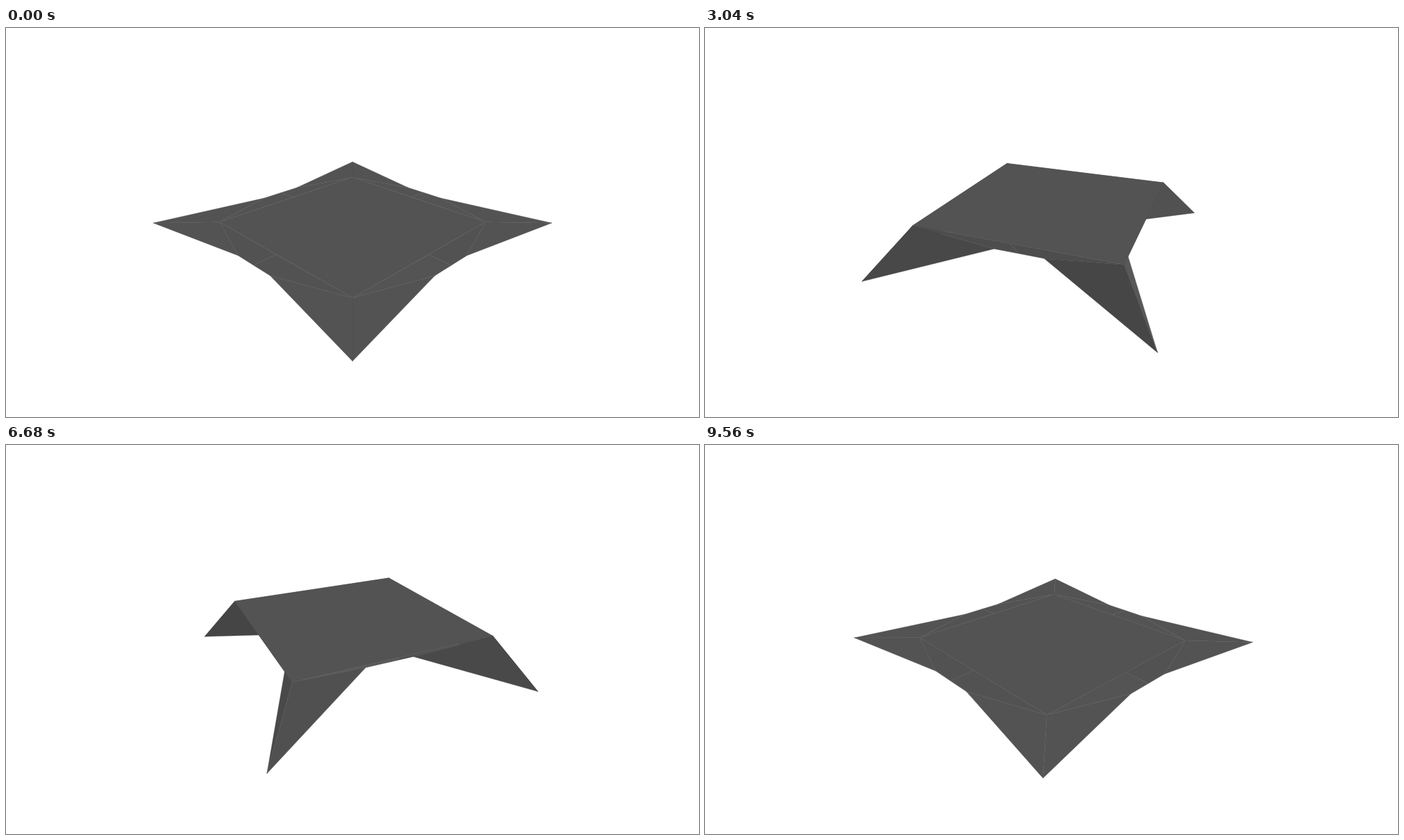
An HTML page with a canvas for the animation above (9.6 s loop, 998 px wide and 561 px high).

```html
<!DOCTYPE html>
<html>
<head>
<meta charset="utf-8">
<title>Folding table</title>
<style>
html, body { margin: 0; width: 100%; height: 100%; overflow: hidden; background: #fff; }
canvas { display: block; }
</style>
</head>
<body>
<canvas id="stage" width="998" height="561"></canvas>
<script>
const ctx = document.getElementById('stage').getContext('2d');
const LOOP = 9600, STEP = 40;
const DIST = 19.85, FOCAL = 671.6, SIN = 0.4252, COS = 0.905;
const CAM = [0, DIST * COS, DIST * SIN];

const sub = (a, b) => a.map((v, i) => v - b[i]);
const dot = (a, b) => a[0] * b[0] + a[1] * b[1] + a[2] * b[2];
const unit = v => { const l = Math.hypot(...v) || 1; return v.map(c => c / l); };
const cross = (a, b) => [
  a[1] * b[2] - a[2] * b[1],
  a[2] * b[0] - a[0] * b[2],
  a[0] * b[1] - a[1] * b[0]
];

// Side coordinates (outward, along, up) to the stage (right, near, up).
const turn = (p, a) => [
  p[0] * Math.sin(a) + p[1] * Math.cos(a),
  p[0] * Math.cos(a) - p[1] * Math.sin(a),
  p[2]
];

const depth = p => DIST - p[1] * COS - p[2] * SIN;

function project(p) {
  const k = FOCAL / depth(p);
  return [499 + p[0] * k, 280.5 + (p[1] * SIN - p[2] * COS) * k];
}

function shade(n, half) {
  let v = 80 + 8 * n[0] - 10 * n[1] + 3 * n[2] + 12 * Math.max(0, -n[2]);
  return v - half * 18 * Math.max(0, n[0]);
}

// Leg angle that keeps every panel rigid for a given rim angle.
function legAngle(rim) {
  const p = 3 - Math.cos(rim), q = Math.SQRT2 * Math.sin(rim);
  return Math.acos(Math.min(1, 2 / Math.hypot(p, q))) - Math.atan2(q, p);
}

function sidePanels(rim) {
  const leg = legAngle(rim);
  const out = 4 + 2 * Math.cos(leg), top = Math.SQRT2 * Math.sin(leg);
  const edge = 4 + Math.cos(rim), low = top - Math.sin(rim);
  const T = s => [4, 4 * s, top];
  const E = s => [edge, s, low];
  const C = s => [out, out * s, -top];
  const M = [4, 0, top], N = [edge, 0, low];
  return {
    corner: T(1),
    panels: [
      { pts: [T(1), E(1), C(1)], half: 0 },
      { pts: [T(-1), C(-1), E(-1)], half: 0 },
      { pts: [T(1), M, N, E(1)], half: 1 },
      { pts: [M, T(-1), E(-1), N], half: -1 }
    ]
  };
}

function fill(pts, tone) {
  const v = Math.round(tone);
  ctx.fillStyle = ctx.strokeStyle = `rgb(${v},${v},${v})`;
  ctx.lineWidth = 0.4;
  ctx.lineJoin = 'round';
  ctx.beginPath();
  pts.forEach(p => ctx.lineTo(...project(p)));
  ctx.closePath();
  ctx.fill();
  ctx.stroke();
}

function draw(ms) {
  const i = Math.floor((ms % LOOP) / STEP);
  const spin = i * STEP / LOOP * 2 * Math.PI;
  const j = i % 120;
  const rim = 3 * Math.min(j + 1, 120 - j) * Math.PI / 180;
  const { corner, panels } = sidePanels(rim);
  const faces = [], plate = [];

  for (let k = 0; k < 4; k++) {
    const a = spin + Math.PI / 4 + k * Math.PI / 2;
    plate.push(turn(corner, a));
    for (const { pts, half } of panels) {
      const flat = unit(cross(sub(pts[1], pts[0]), sub(pts[2], pts[0])));
      const n = turn(flat, a), p = pts.map(q => turn(q, a));
      const front = dot(n, sub(CAM, p[0])) > 0;
      const far = p.reduce((sum, q) => sum + depth(q), 0) / p.length;
      faces.push({ p, far, tone: front ? shade(n, half) : 76 });
    }
  }

  ctx.fillStyle = '#fff';
  ctx.fillRect(0, 0, 998, 561);
  faces.sort((a, b) => b.far - a.far).forEach(f => fill(f.p, f.tone));
  fill(plate, 83);
}

const start = performance.now();
function tick() {
  draw(performance.now() - start);
  requestAnimationFrame(tick);
}
tick();
</script>
</body>
</html>
```
